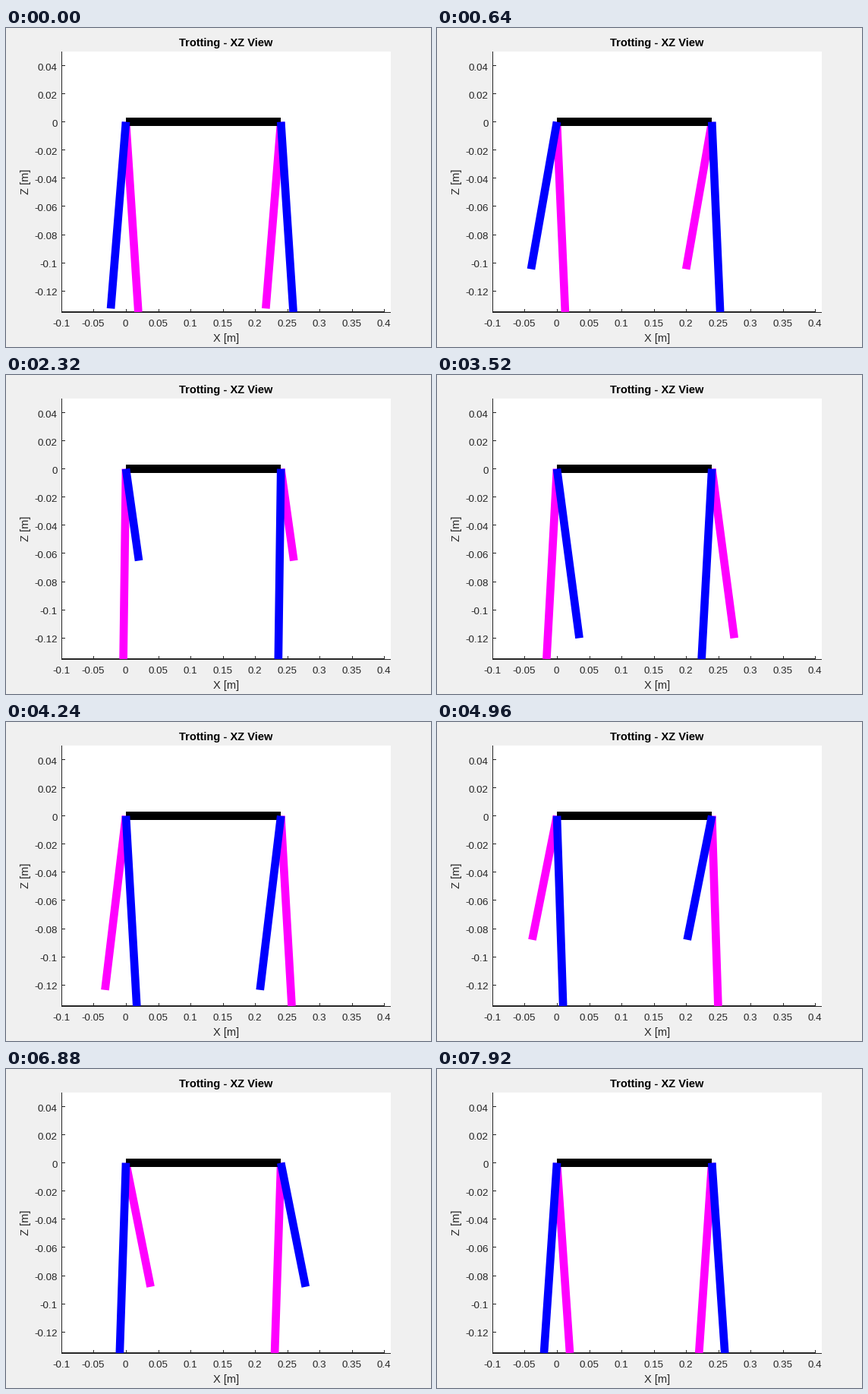
These frames come from a looping animation (560x420 px, 8000 ms). A matplotlib script:

```python
import math

import matplotlib.pyplot as plt
from matplotlib.animation import FuncAnimation
from matplotlib.patches import Rectangle

W, H, DPI = 560, 420, 100
PT = 72 / DPI                        # points per pixel
FRAMES, HALF = 100, 50
LEFT, RIGHT, TOP, BOTTOM = 73, 507, 31, 374
INK = "#262626"
BLUE, MAGENTA = "#0000ff", "#ff00ff"
BODY = 0.24
STRIDE, GROUND = 0.02, -0.135

plt.rcParams["font.family"] = "Liberation Sans"


def px(x):
    return 158 + 851 * x


def pz(z):
    return 123.6 - 1855 * z


def swing(s):
    """Symmetric Bezier arc of the lifted foot."""
    q = 1 - s
    x = (-STRIDE * (q**5 - s**5)
         - 0.055 * 5 * s * q * (q**3 - s**3)
         - 0.075 * 10 * (s * q)**2 * (q - s))
    lift = (0.02 * 6 * s * q * (q**4 + s**4)
            + 0.0575 * 15 * (s * q)**2 * (q**2 + s**2)
            + 0.143 * 20 * (s * q)**3)
    return x, GROUND + lift


def foot(step):
    """Foot position relative to the hip: half a cycle swing, half stance."""
    step %= 2 * HALF
    if step < HALF:
        return swing(step / HALF)
    return STRIDE * (1 - 2 * (step - HALF) / HALF), GROUND


fig = plt.figure(figsize=(W / DPI, H / DPI), dpi=DPI, facecolor="#f0f0f0")
ax = fig.add_axes([0, 0, 1, 1])
ax.set_xlim(0, W)
ax.set_ylim(H, 0)
ax.axis("off")


def box(x, y, w, h, color=INK, zorder=1):
    ax.add_patch(Rectangle((x, y), w, h, fc=color, lw=0, zorder=zorder))


def label(x, y, text, size=13.33, color=INK, ha="center", **kw):
    ax.text(x, y, text, fontsize=size * PT, color=color, ha=ha,
            va="baseline", **kw)


box(LEFT, TOP, RIGHT - LEFT, BOTTOM - TOP, "white", 0)
box(LEFT, TOP, 1, BOTTOM - TOP + 1)
box(LEFT, BOTTOM, RIGHT - LEFT, 1)
# ground line
box(LEFT, BOTTOM - 1, round(px(0.4)) - LEFT, 1)

for i in range(11):
    x = -0.1 + 0.05 * i
    box(round(px(x)), BOTTOM - 4, 1, 4)
    label(px(x) - 0.4, 393, f"{round(x, 2) + 0:g}")

for i in range(9):
    z = 0.04 - 0.02 * i
    box(LEFT, math.floor(pz(z)), 5, 1)
    label(67.7, pz(z) + 6.2, f"{round(z, 2) + 0:g}", ha="right")

label(290, 24, "Trotting - XZ View", 14.67, "black", weight="bold")
label(290, 413, "X [m]", 14.67)
label(30, 202.5, "Z [m]", 14.67, rotation=90, rotation_mode="anchor")

box(158, 118, 204, 11, "black", 3)

window = Rectangle((LEFT, TOP), RIGHT - LEFT, BOTTOM - TOP,
                   transform=ax.transData)


def bar(color, zorder):
    line, = ax.plot([], [], color=color, lw=10.67 * PT,
                    solid_capstyle="butt", zorder=zorder)
    line.set_clip_path(window)
    return line


# (line, hip, phase offset): diagonal legs move together
legs = [(bar(MAGENTA, 2), 0, HALF), (bar(MAGENTA, 2), BODY, 0),
        (bar(BLUE, 4), 0, 0), (bar(BLUE, 4), BODY, HALF)]


def update(i):
    for line, hip, offset in legs:
        x, z = foot(i + 1 + offset)
        line.set_data([px(hip), px(hip + x)], [pz(0), pz(z)])
    return [leg[0] for leg in legs]


anim = FuncAnimation(fig, update, frames=FRAMES, interval=80, repeat=True,
                     repeat_delay=0, blit=False)
plt.show()
```
